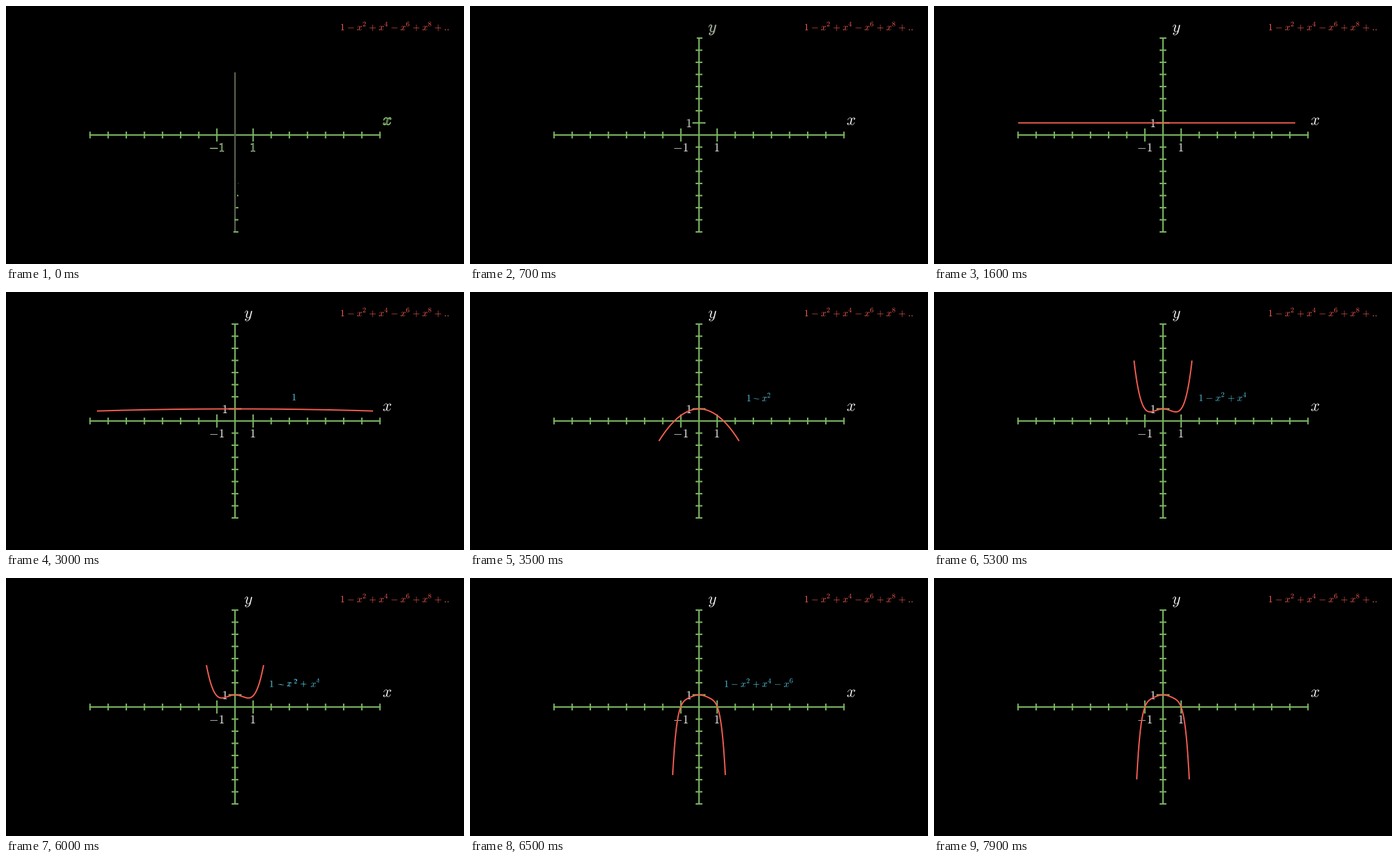
A matplotlib script for the animation above (8 s loop, 700 px wide and 394 px high).

```python
import numpy as np
import matplotlib.pyplot as plt
from matplotlib.animation import FuncAnimation
from matplotlib.patches import PathPatch
from matplotlib.path import Path
from matplotlib.textpath import TextPath

plt.rcParams["mathtext.fontset"] = "cm"

W, H, DPI = 700, 394, 64
FRAMES, STEP = 80, 100
PX = 72 / DPI
CX, CY = 350, 197
UX, UY = 27.69, 18.5
GREEN, RED, BLUE, WHITE = "#7ab560", "#f45e51", "#58c4dd", "#ececec"
DIM = "#5c6654"

fig = plt.figure(figsize=(W / DPI, H / DPI), dpi=DPI, facecolor="black")
ax = fig.add_axes([0, 0, 1, 1])
ax.set(xlim=(0, W), ylim=(H, 0))
ax.axis("off")


# ---- easing -------------------------------------------------------------
def smooth(t):
    t = np.clip(t, 0, 1)
    sig = lambda v: 1 / (1 + np.exp(-v))
    edge = sig(-5)
    return float(np.clip((sig(10 * (t - 0.5)) - edge) / (1 - 2 * edge), 0, 1))


def ramp(t, start, length):
    return float(np.clip((t - start) / length, 0, 1))


def mix(a, b, p):
    return (1 - p) * a + p * b


def blend(c1, c2, p):
    rgb = lambda c: np.array([int(c[i:i + 2], 16) / 255 for i in (1, 3, 5)])
    return tuple(mix(rgb(c1), rgb(c2), p))


# ---- glyph outlines -----------------------------------------------------
def resample(poly, n=120):
    dist = np.r_[0, np.cumsum(np.hypot(*np.diff(poly, axis=0).T))]
    at = np.linspace(0, dist[-1], n)
    return np.column_stack([np.interp(at, dist, poly[:, k]) for k in (0, 1)])


def glyph(ch, size, x, y):
    polys = TextPath((0, 0), f"${ch}$", size=100).to_polygons()
    shapes = []
    for poly in polys:
        if len(poly) < 4:
            continue
        body = poly[:-1]
        start = int(np.argmin(body[:, 0] - body[:, 1]))
        body = np.roll(body, -start, axis=0)
        loop = resample(np.vstack([body, body[:1]]))
        shapes.append(loop * [size / 100, -size / 100] + [x, y])
    return sorted(shapes, key=lambda s: -np.ptp(s[:, 0]) * np.ptp(s[:, 1]))


def layout(expr, size, center):
    """Typeset a polynomial; a digit after x is an exponent."""
    em, x, glyphs, prev = size, 0.0, [], ""
    for ch in expr:
        if ch in "+-":
            gap = 0.222 * em if prev else 0
            glyphs.append(glyph(ch, em, x + gap, 0))
            x += 2 * gap + 0.778 * em
        elif ch.isdigit() and prev == "x":
            glyphs.append(glyph(ch, 0.73 * em, x + 0.01 * em, -0.413 * em))
            x += 0.449 * em
        else:
            glyphs.append(glyph(ch, em, x, 0))
            x += {"x": 0.572, ".": 0.278}.get(ch, 0.5) * em
        prev = ch
    ink = np.vstack([s for g in glyphs for s in g])
    shift = np.array(center) - (ink.min(0) + ink.max(0)) / 2
    return [[s + shift for s in g] for g in glyphs]


def compound(shapes):
    return Path.make_compound_path(*[Path(s, closed=True) for s in shapes])


def add_text(glyphs, color, z=2):
    patches = [PathPatch(compound(g), fc=color, ec="none", lw=0, zorder=z)
               for g in glyphs]
    for patch in patches:
        ax.add_patch(patch)
    return patches


def morph(g1, g2, p):
    """Blend two glyphs; unmatched contours grow from or shrink to a point."""
    out = []
    for i in range(max(len(g1), len(g2))):
        a = g1[i] if i < len(g1) else np.tile(g1[0].mean(0), (len(g2[i]), 1))
        b = g2[i] if i < len(g2) else np.tile(g2[0].mean(0), (len(a), 1))
        out.append(mix(a, b, p))
    return out


# ---- axes ---------------------------------------------------------------
def line(xs, ys, color=GREEN, width=2.2, z=1):
    return ax.plot(xs, ys, color=color, lw=width * PX, zorder=z, snap=False,
                   solid_capstyle="butt", solid_joinstyle="round")[0]


line([CX - 8 * UX - 1, CX + 8 * UX + 1], [CY, CY])
for k in range(-8, 9):
    if k:
        half = 10 if abs(k) == 1 else 5.2
        line([CX + k * UX] * 2, [CY - half, CY + half])

y_axis = line([CX, CX], [CY + 8 * UY, CY - 8 * UY])
y_ticks = [(k, line([], [])) for k in range(-8, 9) if k]

# patches, time the outline starts, time the fill starts, fill length
labels = [
    (add_text(layout("x", 25, (582.5, 176)), WHITE), -500, -50, 500),
    (add_text(layout("-1", 18.7, (322.5, 215.8)), WHITE), -500, -150, 500),
    (add_text(layout("1", 18.7, (377.5, 215.8)), WHITE), -500, -150, 500),
    (add_text(layout("1", 18.7, (334.8, 178.8)), WHITE), 150, 350, 400),
    (add_text(layout("y", 25, (370.5, 36.5)), WHITE), 150, 400, 400),
]
add_text(layout("1-x2+x4-x6+x8+..", 14.85, (594.2, 31)), RED)


def draw_axes(t):
    top = mix(CY + 8 * UY, CY - 8 * UY, min(1, 0.82 + t / 900))
    y_axis.set_data([CX, CX], [CY + 8 * UY + 1, top - 1])
    y_axis.set_color(blend(DIM, GREEN, ramp(t, 0, 500)))
    for i, (k, tick) in enumerate(y_ticks):
        grow = ramp(t, 45 * i - 190, 260)
        half = 10 if k == 1 else 5.2
        tick.set_data([CX + half, CX + half - 2 * half * grow],
                      [CY - k * UY] * 2)
        tick.set_visible(grow > 0)
    for patches, begin, fill_at, length in labels:
        edge = ramp(t, begin, 250)
        fill = ramp(t, fill_at, length)
        for patch in patches:
            patch.set_visible(edge > 0)
            patch.set_facecolor((*blend(GREEN, WHITE, fill), fill))
            patch.set_edgecolor((*blend(GREEN, WHITE, fill), edge))
            patch.set_linewidth(1.1 * (1 - fill) * PX)


# ---- series approximations ----------------------------------------------
def partial_sum(terms, reach):
    x = np.linspace(-reach, reach, 301)
    y = sum((-1) ** n * x ** (2 * n) for n in range(terms))
    return np.column_stack([CX + UX * x, CY - UY * y])


CURVES = [partial_sum(n + 1, r) for n, r in enumerate((8, 1.7, 1.6, 1.45))]
FORMULAS = [layout(s, 14.85, (441.3, 160.3))
            for s in ("1", "1-x2", "1-x2+x4", "1-x2+x4-x6")]
LINE_START = 805
STARTS = (2765, 4247, 5678)
FADE_START = 7080

curve = line([], [], RED, 2, z=4)
pool = add_text(FORMULAS[-1], BLUE, z=3)


def draw_curve(t):
    pts = CURVES[0]
    for start, target in zip(STARTS, CURVES[1:]):
        pts = mix(pts, target, smooth((t - start) / 1000))
    if t < STARTS[0]:
        p = smooth((t - LINE_START) / 1000)
        a, b = pts[0], pts[-1]
        pts = np.array([a, mix(a, b, p)])
    curve.set_data(pts[:, 0], pts[:, 1])
    curve.set_visible(t > LINE_START)


def draw_formula(t):
    for patch in pool:
        patch.set_visible(False)
    if t < STARTS[0]:
        return
    stage = sum(t >= s for s in STARTS) - 1
    p = smooth((t - STARTS[stage]) / 1000)
    alpha = 1 - smooth((t - FADE_START) / 1000)
    old, new = FORMULAS[stage], FORMULAS[stage + 1]
    sources = [j * len(old) // len(new) for j in range(len(new))]
    for j, src in enumerate(sources):
        # repeated source glyphs start transparent
        copy = j > 0 and sources[j - 1] == src
        pool[j].set_path(compound(morph(old[src], new[j], p)))
        pool[j].set_alpha(alpha * (p if copy else 1))
        pool[j].set_visible(alpha > 0.06)


def update(frame):
    t = frame * STEP
    draw_axes(t)
    draw_curve(t)
    draw_formula(t)
    return []


anim = FuncAnimation(fig, update, frames=FRAMES, interval=STEP,
                     init_func=lambda: [], repeat=True, repeat_delay=0,
                     blit=False)
plt.show()
```
